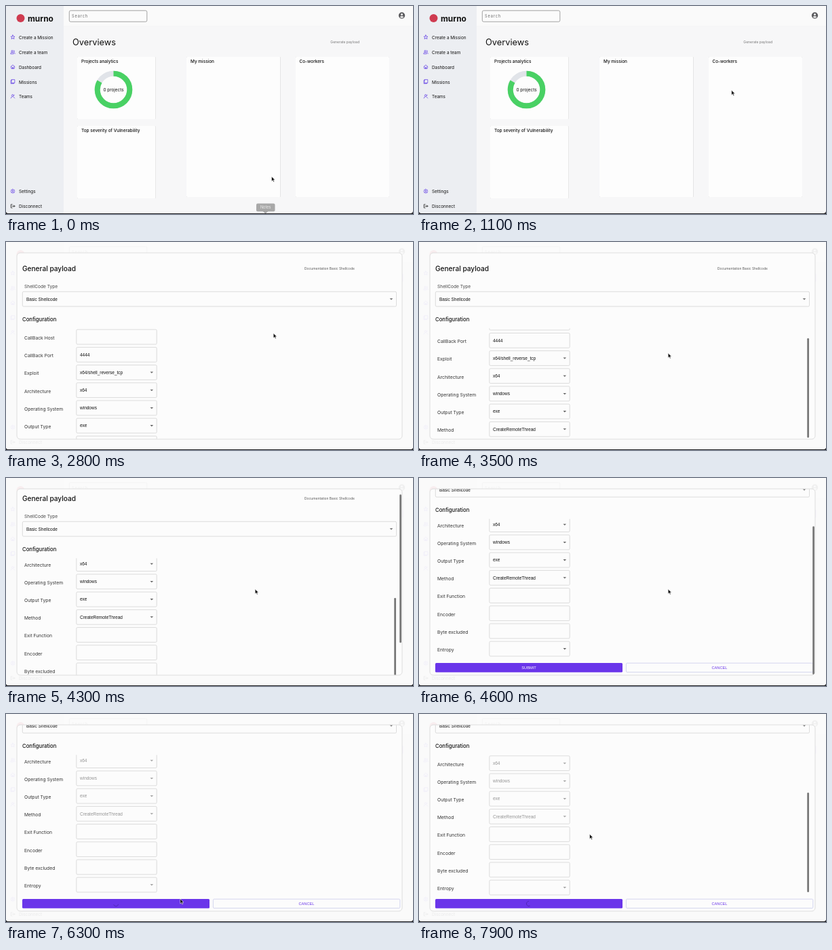
These frames come from a looping animation (600x307 px, 8 s). An HTML page:

```html
<!DOCTYPE html>
<html lang="en">
<head>
<meta charset="utf-8">
<title>Payload generator</title>
<style>
  html, body { margin: 0; width: 100%; height: 100%; overflow: hidden; background: #1f1f22; }
  svg { display: block; width: 100vw; height: 100vh; }
  text { font-family: Inter, "Open Sans", sans-serif; fill: #111; white-space: pre; }
  .field { font-family: "Liberation Sans", Arial, sans-serif; }
  .card { fill: #fdfdfd; filter: drop-shadow(.7px .8px .6px rgba(0, 0, 0, .34)); }
  .box { fill: none; stroke: #c6c6c6; stroke-width: .6; }
  .icon { fill: none; stroke: #6c4ce6; stroke-width: .8; stroke-linejoin: round; stroke-linecap: round; }
  .arrow { fill: #666; }
  .disabled .value { fill: #959595; }
  .disabled .rows .arrow { fill: #a5a5a5; }
</style>
</head>
<body>
<svg id="stage" viewBox="0 0 600 307" preserveAspectRatio="none"></svg>
<script>
const LOOP = 8000, STEP = 100;
const ROW_PITCH = 26.2, FIRST_ROW = 140.1;

// y is the middle of the capitals
const text = (x, y, str, size, extra = '') =>
  `<text x="${x}" y="${(y + size * .36).toFixed(2)}" font-size="${size}" ${extra}>${str}</text>`;
const rect = (x, y, w, h, extra = '') =>
  `<rect x="${x}" y="${y}" width="${w}" height="${h}" ${extra}/>`;
const arrow = (x, y) => `<path class="arrow" d="M${x - 2.3} ${y - 1}h4.6l-2.3 2.3z"/>`;
const icon = (x, y, d, extra = '') =>
  `<path class="icon" transform="translate(${x} ${y})" d="${d}" ${extra}/>`;

const shapes = {
  star: 'M0-3L.9-.9L3-.8L1.4.6L2 2.8L0 1.6L-2 2.8L-1.4.6L-3-.8L-.9-.9Z',
  users: 'M-1-2.4a1.2 1.2 0 1 0 .01 0M-3.2 2.4q0-2 2.2-2t2.2 2zM1.3-2.3q1.2.1 1.2 1.2T1.3.1M2 .7q1.3.4 1.3 1.7',
  home: 'M-3 0L0-2.8L3 0M-2.2-.5V2.7H2.2V-.5M-.6 2.7V.8H.6V2.7',
  pages: 'M-1.6-3H2.8V2H-1.6ZM-1.6-2H-2.8V3H1.6V2',
  person: 'M-.4-2.7a1.4 1.4 0 1 0 .01 0M-2.8 2.6q.2-2 2.2-2.3M.8.6L2.8 2.6M1-.4q1.5-.6 1-2',
  gear: 'M0-3L1-2.1L2.3-2L2.2-.8L3 0L2.2.9L2.3 2.1L1 2.1L0 3L-1 2.1L-2.3 2.1L-2.2.9L-3 0L-2.2-.8L-2.3-2L-1-2.1ZM0-1a1 1 0 1 0 .01 0',
  exit: 'M-.8-2.5H-2.7V2.5H-.8M-1 0H2.9M1.5-1.4L2.9 0L1.5 1.4'
};

const nav = [
  ['star', 46.5, 'Create a Mission'], ['users', 68.5, 'Create a team'],
  ['home', 90.3, 'Dashboard'], ['pages', 112.2, 'Missions'],
  ['person', 134, 'Teams'], ['gear', 274, 'Settings'], ['exit', 296, 'Disconnect']
].map(([name, y, label]) =>
  icon(10, y - .6, shapes[name], name === 'exit' ? 'style="stroke:#222"' : '') +
  text(19, y, label, 6.4)).join('');

const cards = [
  [105, 75, 115.3, 92, 111, 82, 'Projects analytics'],
  [105, 177, 115.3, 107, 111, 183.3, 'Top severity of Vulnerability'],
  [266, 75, 138.5, 207, 272, 82, 'My mission'],
  [427, 75, 138, 207, 432.5, 82, 'Co-workers']
].map(([x, y, w, h, tx, ty, title]) =>
  rect(x, y, w, h, 'class="card" rx="1"') + text(tx, ty, title, 6.45, 'font-weight="500"')).join('');

const donut = `<g fill="none" stroke-width="8" transform="rotate(-90 158.5 123.5)">
  <circle cx="158.5" cy="123.5" r="23.8" stroke="#e1e4e9"/>
  <circle cx="158.5" cy="123.5" r="23.8" stroke="#49d164" pathLength="100" stroke-dasharray="83.5 100"/></g>` +
  text(158.5, 123.8, '0 projects', 6.4, 'text-anchor="middle"');

const dashboard = rect(0, 0, 600, 307, 'fill="#f7f7f8"') +
  rect(85, 0, 515, 30, 'fill="#fafafa"') + rect(85, 29.7, 515, .5, 'fill="#ededee"') +
  rect(0, 0, 85, 307, 'fill="#eceef2"') +
  '<circle cx="21.5" cy="18" r="6" fill="#cf3b50"/>' +
  text(32, 18.3, 'murno', 11.9, 'font-weight="700"') + nav +
  rect(93.3, 6.8, 114.5, 16.4, 'rx="2" fill="#fbfbfb" stroke="#8d8d8d" stroke-width=".8"') +
  text(97, 15, 'Search', 5.6, 'letter-spacing=".9" style="fill:#666"') +
  `<circle cx="583.5" cy="14" r="4.7" fill="#5d5d60"/><circle cx="583.5" cy="12.5" r="1.5" fill="#fafafa"/>
   <path d="M580.6 16.3q2.9-2.4 5.8 0q-2.9 2.6-5.8 0z" fill="#fafafa"/>` +
  text(98, 53, 'Overviews', 12.8) +
  rect(414, 46, 171.7, 13.6, 'id="hover" rx="3" fill="#bda6f5"') +
  text(499.7, 52.8, 'Generate payload', 5.1, 'id="generate" text-anchor="middle"') +
  cards + donut +
  `<g id="tip"><path d="M378.5 303h8l-4 3.4z" fill="#a8a8a8"/>` +
  rect(369, 291.5, 27.5, 11.7, 'rx="2" fill="#a8a8a8"') +
  text(382.7, 297.4, 'Notes', 5.6, 'text-anchor="middle" style="fill:#ececec"') + '</g>';

const rows = [
  ['CallBack Host', ''], ['CallBack Port', '4444'], ['Exploit', 'x64/shell_reverse_tcp', 1],
  ['Architecture', 'x64', 1], ['Operating System', 'windows', 1], ['Output Type', 'exe', 1],
  ['Method', 'CreateRemoteThread', 1], ['Exit Function', ''], ['Encoder', ''],
  ['Byte excluded', ''], ['Entropy', '', 1]
].map(([label, value, isSelect], i) => {
  const y = FIRST_ROW + i * ROW_PITCH;
  return text(27, y + 1.4, label, 6.75, 'style="fill:#333"') +
    rect(103.8, y - 10.9, 118.4, 21.8, 'class="box" rx="1.6"') +
    text(109, y, value, 6.5, 'class="field value"') + (isSelect ? arrow(214.8, y) : '');
}).join('');

const dialog = rect(0, 0, 600, 307, 'fill="#fbfbfb" opacity=".93"') +
  rect(16, 16, 568, 275, 'rx="5" fill="#fcfcfc" stroke="#d6d6d6" stroke-width=".8"') +
  `<g clip-path="url(#paper)"><g id="page">` +
  text(24, 39.3, 'General payload', 10.15, 'font-weight="500"') +
  text(440, 39, 'Documentation Basic Shellcode', 4.95, 'style="fill:#555"') +
  text(27, 65.3, 'ShellCode Type', 6.6, 'style="fill:#444"') +
  rect(24.3, 73.3, 551.2, 21.8, 'class="box" rx="1.6"') +
  text(30, 84.2, 'Basic Shellcode', 6.45, 'class="field"') + arrow(568, 84.2) +
  text(24, 114.6, 'Configuration', 7.7, 'font-weight="500"') +
  `<g clip-path="url(#list)"><g id="rows" class="rows">${rows}</g></g>` +
  rect(572.2, 127, 2.8, 147, 'id="innerBar" rx="1.4" fill="#7a7a7a"') +
  rect(24, 340, 276, 13.8, 'rx="1.5" fill="#6a35ea"') +
  text(162, 347, 'SUBMIT', 5.7, 'id="submit" class="field" text-anchor="middle" style="fill:#fff"') +
  `<circle id="spinner" cx="162" cy="347" r="3.6" fill="none" stroke="#4c25ad" stroke-width=".8" pathLength="100"/>` +
  rect(305.4, 340.2, 275.4, 13.4, 'rx="1.5" fill="none" stroke="#c3c5ea" stroke-width=".7"') +
  text(443, 347, 'CANCEL', 5.7, 'class="field" text-anchor="middle" style="fill:#6a35ea"') +
  '</g>' + rect(580.2, 17, 2.8, 219, 'id="outerBar" rx="1.4" fill="#7a7a7a"') + '</g>';

const stage = document.getElementById('stage');
stage.innerHTML = `<defs>
  <clipPath id="window"><path d="M0 0H600V302q0 4-4 4H4q-4 0-4-4z"/></clipPath>
  <clipPath id="paper">${rect(16.4, 16.4, 567.2, 274.2, 'rx="4.6"')}</clipPath>
  <clipPath id="list">${rect(16, 127.5, 568, 207.5)}</clipPath></defs>` +
  rect(0, 0, 600, 307, 'fill="#1f1f22"') +
  `<g clip-path="url(#window)">${dashboard}<g id="dialog">${dialog}</g></g>
  <path id="cursor" d="M0 0V7.1L1.7 5.6L2.8 8.1L4 7.6L2.9 5.1H5.1Z" fill="#111" stroke="#fff" stroke-width=".55"/>`;

const part = {};
stage.querySelectorAll('[id]').forEach(node => part[node.id] = node);

// Tables of [time, value]
const cursorX = [[0, 391.5], [600, 457], [800, 457], [1700, 471.3], [2400, 471.3], [3000, 367.2],
  [4900, 367.2], [5800, 256.8], [6700, 256.8], [7600, 251.5]];
const cursorY = [[0, 251.7], [600, 150], [800, 150], [1700, 50.8], [2400, 50.8], [3000, 164],
  [4900, 164], [5800, 272.8], [6700, 272.8], [7600, 177.3]];
const innerScroll = [[3200, 0], [3300, 3], [3400, 10], [3500, 21], [3600, 50], [3700, 73], [3800, 83],
  [7600, 83], [7700, 82], [7900, 79]];
const outerScroll = [[4200, 0], [4300, 9], [4400, 34], [4500, 57], [4600, 67]];
const innerShow = [[3200, 0], [3300, 1], [4300, 1], [4500, 0], [7600, 0], [7700, 1]];
const outerShow = [[4200, 0], [4300, 1], [4900, 1], [5100, 0]];
const hoverShow = [[1400, 0], [1700, 1]];
const tipShow = [[0, 1], [300, 0]];

const linear = k => k;
const smooth = k => k * k * (3 - 2 * k);

function at(keys, t, ease = linear) {
  const next = keys.findIndex(key => key[0] > t);
  if (next === 0) return keys[0][1];
  if (next < 0) return keys[keys.length - 1][1];
  const [t0, a] = keys[next - 1], [t1, b] = keys[next];
  return a + (b - a) * ease((t - t0) / (t1 - t0));
}

const move = (node, x, y) => node.setAttribute('transform', `translate(${x} ${y})`);
const fade = (node, value) => node.setAttribute('opacity', value);

function draw(t) {
  const inner = at(innerScroll, t), outer = at(outerScroll, t);
  const hover = at(hoverShow, t), busy = t >= 5900;

  move(part.cursor, at(cursorX, t, smooth), at(cursorY, t, smooth));
  fade(part.tip, at(tipShow, t));
  fade(part.hover, hover);
  part.generate.style.fill = hover > .5 ? '#f5f0ff' : '#777';
  fade(part.dialog, t >= 2000 ? 1 : 0);

  move(part.page, 0, -outer);
  move(part.rows, 0, -inner);
  move(part.innerBar, 0, inner * .71);
  move(part.outerBar, 0, outer * .81);
  fade(part.innerBar, at(innerShow, t));
  fade(part.outerBar, at(outerShow, t));

  stage.classList.toggle('disabled', busy);
  fade(part.submit, busy ? 0 : 1);
  fade(part.spinner, busy ? 1 : 0);
  const turn = Math.max(0, t - 5900) / 1400;
  const arc = 10 + 50 * Math.sin(Math.PI * (turn % 1)) ** 2;
  part.spinner.setAttribute('stroke-dasharray', `${arc} 100`);
  part.spinner.setAttribute('transform', `rotate(${turn * 360 - 90} 162 347)`);
}

const start = performance.now();
function tick() {
  const t = (performance.now() - start) % LOOP;
  draw(Math.floor(t / STEP) * STEP);
  requestAnimationFrame(tick);
}
tick();
</script>
</body>
</html>
```
